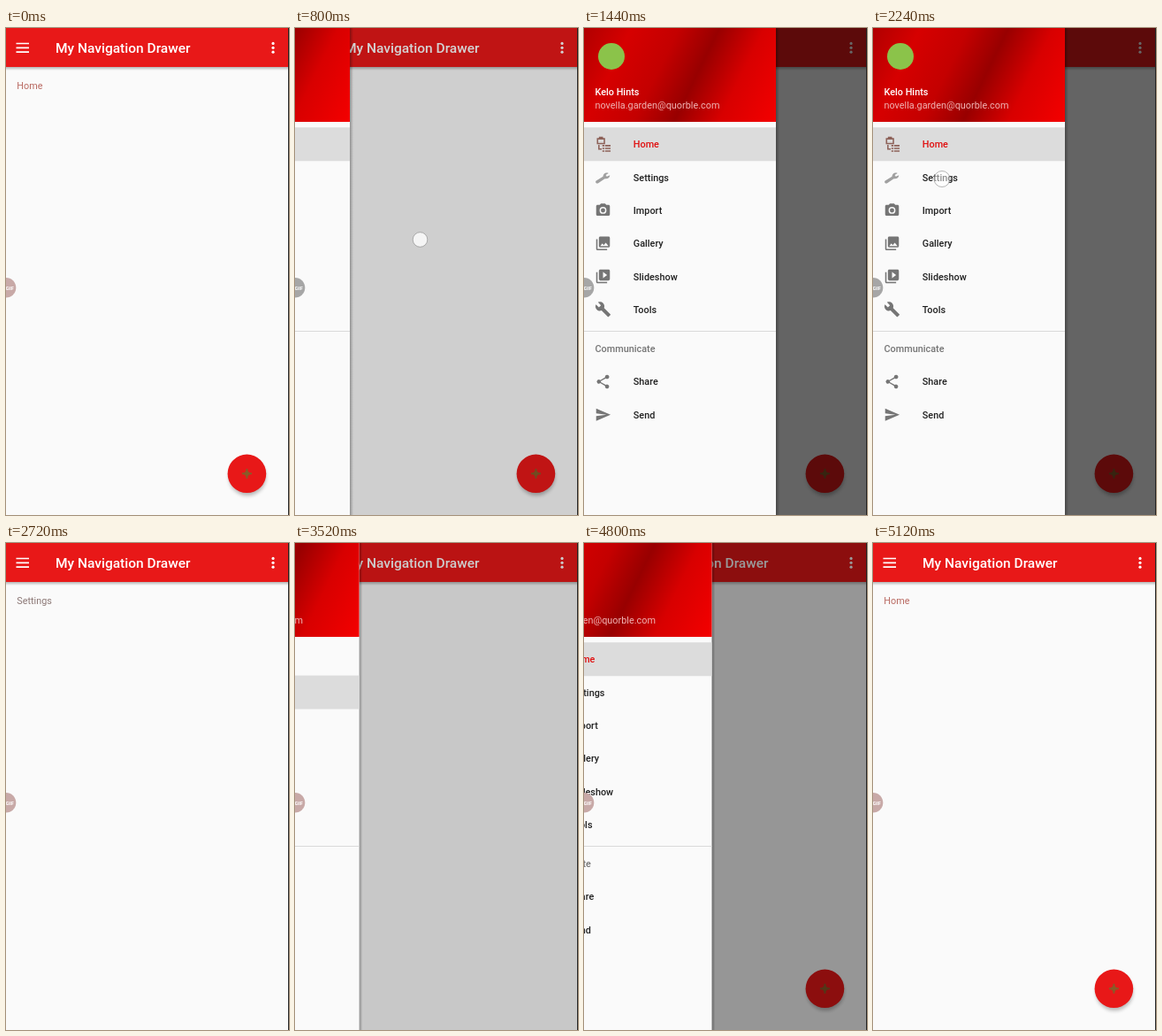
Write an HTML page that moves like this. It is 320x550 px and loops after 5600 ms.

```html
<!DOCTYPE html>
<html lang="en">
<head>
<meta charset="utf-8">
<title>Navigation drawer</title>
<style>
  html, body { margin: 0; width: 100%; height: 100%; overflow: hidden; background: #fafafa; }
  svg { display: block; width: 100vw; height: 100vh; font-family: Roboto, sans-serif; font-size: 10.85px; }
  .medium { font-weight: 500; }
</style>
</head>
<body>
<svg viewBox="0 0 320 550" preserveAspectRatio="none">
  <defs>
    <linearGradient id="headerFill" gradientUnits="userSpaceOnUse" x1="0" y1="0" x2="217" y2="106">
      <stop offset="0" stop-color="#b00000"/>
      <stop offset=".2" stop-color="#d60000"/>
      <stop offset=".4" stop-color="#c40000"/>
      <stop offset=".57" stop-color="#980000"/>
      <stop offset=".76" stop-color="#d80000"/>
      <stop offset="1" stop-color="#f40000"/>
    </linearGradient>
    <linearGradient id="barShadow" x2="0" y2="1">
      <stop stop-color="#000" stop-opacity=".28"/>
      <stop offset="1" stop-color="#000" stop-opacity="0"/>
    </linearGradient>
    <linearGradient id="edgeShadow">
      <stop stop-color="#000" stop-opacity=".3"/>
      <stop offset="1" stop-color="#000" stop-opacity="0"/>
    </linearGradient>
    <filter id="soft" x="-30%" y="-30%" width="160%" height="160%"><feGaussianBlur stdDeviation="2"/></filter>
  </defs>

  <rect width="320" height="550" fill="#fafafa"/>
  <rect y="44" width="320" height="4" fill="url(#barShadow)"/>
  <rect width="320" height="44" fill="#e81818"/>
  <path d="M11.5 17.5h14.5M11.5 22.3h14.5M11.5 27.1h14.5" stroke="#fff" stroke-width="1.7"/>
  <g fill="#fff">
    <circle cx="302" cy="17.4" r="1.6"/><circle cx="302" cy="22.3" r="1.6"/><circle cx="302" cy="27.2" r="1.6"/>
    <text class="medium" x="56" y="28" font-size="15.5">My Navigation Drawer</text>
  </g>
  <text id="pageText" x="12.3" y="68.5"></text>

  <g id="fab">
    <circle cx="273" cy="507" r="21" opacity=".28" filter="url(#soft)"/>
    <circle cx="272.4" cy="503.3" r="21.8" fill="#e81818"/>
    <path d="M272.4 497.8v11M266.9 503.3h11" stroke="#8a5a28" stroke-width="2"/>
    <path d="M272.4 499.3l4 4-4 4-4-4z" fill="#8a5a28"/>
  </g>

  <rect id="scrim" width="320" height="550"/>

  <g id="drawer">
    <rect x="217" width="4" height="550" fill="url(#edgeShadow)"/>
    <rect width="217" height="550" fill="#fafafa"/>
    <rect width="217" height="106" fill="url(#headerFill)"/>
    <circle cx="31" cy="32" r="15" fill="#8bc34a"/>
    <text class="medium" x="12.5" y="75.7" fill="#fff">Kelo Hints</text>
    <text x="12.5" y="90.7" fill="#f0b4b4">novella.garden@quorble.com</text>
    <rect id="selection" width="217" height="38" fill="#dcdcdc"/>
    <path d="M0 342.5h217" stroke="#dadada"/>
    <text class="medium" x="12.5" y="366.2" fill="#757575">Communicate</text>
    <g id="items"></g>
  </g>

  <g id="badge">
    <circle cx="0" cy="293.3" r="11.3"/>
    <text x="-.5" y="295.8" font-size="6.2" font-weight="700" fill="#fff">GIF</text>
  </g>
  <circle id="touch" fill="#fff" stroke="#888" stroke-opacity=".6"/>
  <rect x="319" width="1" height="550" fill="#222"/>
</svg>
<script>
const LOOP = 5600, STEP = 160, WIDTH = 217;
const $ = id => document.getElementById(id);
const set = (el, attrs) => { for (const k in attrs) el.setAttribute(k, attrs[k]); };

const icons = {
  Home: 'M3 3h3V1h6v2h3v9H3zM5 5v5h8V5zM11 13h3v2h-3zM15 13h8v2h-8zM11 17h3v2h-3zM15 17h8v2h-8zM11 21h3v2h-3zM15 21h8v2h-8zM5 13h2v5h3v2H5z',
  Settings: 'M2 17L12 11C12 7 16 4 20 6L16 8.5l1.5 2.5L22 9C22 13 18 15 14.5 14L5 20.5C2 22 0 18.500 2 17z',
  Import: 'M9 2L7.17 4H4c-1.1 0-2 .9-2 2v12c0 1.1.9 2 2 2h16c1.1 0 2-.9 2-2V6c0-1.1-.9-2-2-2h-3.17L15 2zm3 15a5 5 0 1 1 0-10 5 5 0 0 1 0 10zm0-1.8a3.2 3.2 0 1 0 0-6.4 3.2 3.2 0 0 0 0 6.4z',
  Gallery: 'M22 16V4c0-1.1-.9-2-2-2H8c-1.1 0-2 .9-2 2v12c0 1.1.9 2 2 2h12c1.1 0 2-.9 2-2zm-11-4l2.03 2.71L16 11l4 5H8zM2 6v14c0 1.1.9 2 2 2h14v-2H4V6z',
  Slideshow: 'M4 6H2v14c0 1.1.9 2 2 2h14v-2H4zM20 2H8c-1.1 0-2 .9-2 2v12c0 1.1.9 2 2 2h12c1.1 0 2-.9 2-2V4c0-1.1-.9-2-2-2zm-8 12.5v-9l6 4.5z',
  Tools: 'M22.7 19l-9.1-9.1c.9-2.3.4-5-1.5-6.9-2-2-5-2.4-7.4-1.3L9 6 6 9 1.6 4.7C.4 7.1.9 10.1 2.9 12.1c1.9 1.9 4.6 2.4 6.9 1.5l9.1 9.1c.4.4 1 .4 1.4 0l2.3-2.3c.5-.4.5-1.1.1-1.4z',
  Share: 'M18 2a3 3 0 1 1-2 5.2L8.900 11.3v1.4L16 16.8A3 3 0 1 1 15 18.300L8 14.200a3 3 0 1 1 0-4.400L15 5.700A3 3 0 0 1 18 2z',
  Send: 'M2 21l21-9L2 3v7l15 2-15 2z'
};
const centers = i => i < 6 ? 131.3 + 37.3 * i : 399.4 + 37.3 * (i - 6);

$('items').innerHTML = Object.entries(icons).map(([name, path], i) => {
  const y = centers(i);
  return `<g><path d="${path}" fill-rule="evenodd" transform="translate(12.2 ${y - 9.3}) scale(.775)"/>
    <text class="medium" x="55.8" y="${y + 4}">${name}</text></g>`;
}).join('');
const rows = [...$('items').children];

// Piecewise linear value(s) from rows of [time, ...values].
function track(points, t) {
  const last = points.length - 1;
  if (t <= points[0][0]) return points[0].slice(1);
  if (t >= points[last][0]) return points[last].slice(1);
  const i = points.findIndex(p => p[0] > t), a = points[i - 1], b = points[i];
  const k = (t - a[0]) / (b[0] - a[0]);
  return a.slice(1).map((v, j) => v + (b[j + 1] - v) * k);
}

const dragOpen = [[400, 0], [480, 12], [640, 22], [800, 62], [960, 125], [1120, 185], [1280, 213], [1440, 217]];
const finger = [[320, 8, 213], [480, 30, 219], [640, 80, 229], [800, 141.5, 239], [1120, 257, 281.5]];
const taps = [[2240, 2400, 78, 170.5], [3360, 3520, 19, 22], [4480, 4800, 75, 131]];

// Quintic settle over 512 ms.
const settle = (t, start) => 1 - (1 - Math.min(1, Math.max(0, (t - start) / 512))) ** 5;

function drawerEdge(t) {
  if (t < 2360) return track(dragOpen, t)[0];
  if (t < 2720) return WIDTH * (1 - settle(t, 2360));
  if (t < 3480) return 0;
  if (t < 4760) return WIDTH * settle(t, 3480);
  return t < 5120 ? WIDTH * (1 - settle(t, 4760)) : 0;
}

function drawTouch(t) {
  const tap = taps.find(([from, to]) => t >= from && t < to);
  const dragging = t >= 320 && t < 1280;
  const [x, y] = tap ? tap.slice(2) : track(finger, t);
  set($('touch'), {
    cx: x, cy: y, r: tap ? 9 : 8.3,
    'fill-opacity': tap ? .5 : .78,
    visibility: tap || dragging ? 'visible' : 'hidden'
  });
}

function draw(t) {
  const edge = drawerEdge(t);
  const onSettings = t >= 2400 && t < 4800;
  const selected = onSettings ? 1 : 0;

  set($('drawer'), { transform: `translate(${edge - WIDTH} 0)`, visibility: edge > 0 ? 'visible' : 'hidden' });
  set($('scrim'), { opacity: .6 * edge / WIDTH });
  set($('fab'), { visibility: onSettings ? 'hidden' : 'visible' });
  set($('pageText'), { fill: onSettings ? '#8c7876' : '#b96a62' });
  $('pageText').textContent = onSettings ? 'Settings' : 'Home';
  set($('selection'), { y: centers(selected) - 19 });

  rows.forEach((row, i) => {
    const idle = i === 0 ? '#c3a29c' : i === 1 ? '#a0a0a0' : '#757575';
    set(row.children[0], { fill: i === selected ? '#8d6158' : idle });
    set(row.children[1], { fill: i === selected ? '#e01010' : '#212121' });
  });

  set($('badge').children[0], { fill: t >= 480 && t < 2720 ? '#a6a6a6' : '#c8a9a7' });
  drawTouch(t);
}

function tick() {
  const t = performance.now() % LOOP;
  draw(Math.floor(t / STEP) * STEP);
  requestAnimationFrame(tick);
}
tick();
</script>
</body>
</html>
```
